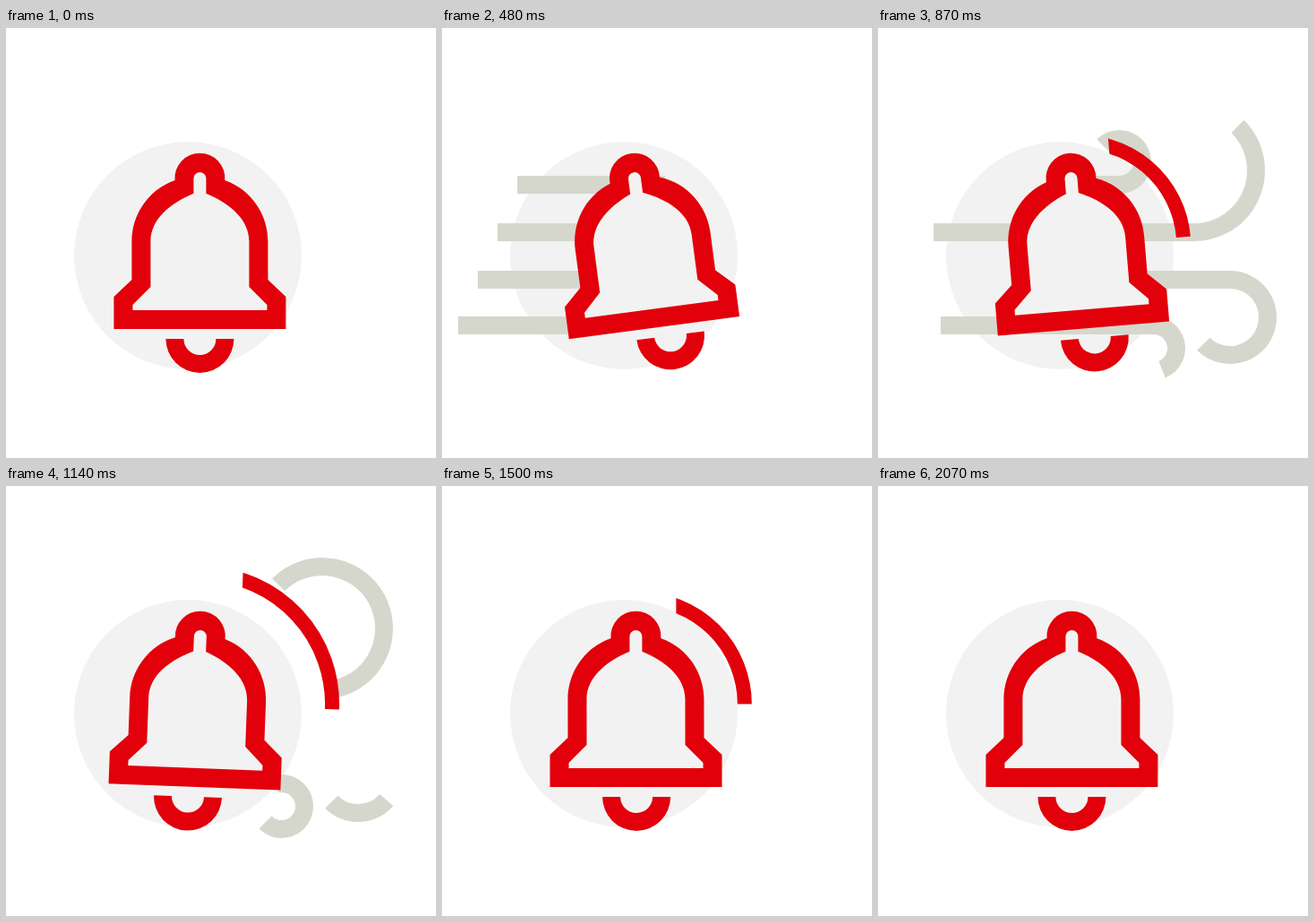
Recreate the animation shown at these times as an HTML page. Size 480 by 480 pixels, loop 2.1 s.

```html
<!DOCTYPE html>
<html lang="en">
<head>
<meta charset="utf-8">
<title>Bell in the wind</title>
<style>
  html, body { margin: 0; width: 100%; height: 100%; overflow: hidden; background: #fff; }
  svg { display: block; width: 100vw; height: 100vh; }
</style>
</head>
<body>
<svg viewBox="0 0 480 480">
  <clipPath id="sector"><rect x="261" y="0" width="260" height="243.5"/></clipPath>
  <circle cx="203" cy="254" r="127" fill="#f2f2f2"/>
  <g id="wind" fill="none" stroke="#d6d7cc" stroke-width="20"></g>
  <g id="bell" fill="#e2000a">
    <path d="M188.1 170A28 28 0 1 1 243.9 170C275 181 292 210 292 238V281L312 300V336H120V300L140 281V238C140 210 157 181 188.1 170Z"/>
    <path fill="#f2f2f2" d="M209 184.7V168a7 7 0 0 1 14 0V184.7C250 196 271 214 271 238V289L291 309V315H141V309L161 289V238C161 214 182 196 209 184.7Z"/>
    <path id="clapper" d="M178 347A38 38 0 0 0 254 347H234A18 18 0 0 1 198 347Z"/>
    <g clip-path="url(#sector)">
      <circle id="wave" cx="220" cy="243.5" fill="none" stroke="#e2000a" stroke-width="16"/>
    </g>
  </g>
</svg>
<script>
const LOOP = 2100, STEP = 30;
const RISE = 220, RELEASE = 406, HALF_SWING = 245;
const WAVE_START = 825, WAVE_PERIOD = 615, WAVE_END = 1820;

const $ = id => document.getElementById(id);
const bell = $('bell'), clapper = $('clapper'), wave = $('wave');
const clamp = v => Math.max(0, Math.min(1, v));

// Blown aside, held by the wind, then released into a fading swing.
function ring(t, size, fade) {
  if (t < RELEASE) return size * (1 - Math.cos(Math.PI * clamp(t / RISE))) / 2;
  const left = (LOOP - t) / (LOOP - RELEASE);
  return size * left ** fade * Math.cos(Math.PI * (t - RELEASE) / HALF_SWING);
}

// A gust is a straight run to turn, then a 225 degree curl (dir -1 up, 1 down).
function gust([y, turn, r, dir, start], i) {
  const x = 84 - 22 * i, k = r * Math.SQRT1_2;
  const path = document.createElementNS('http://www.w3.org/2000/svg', 'path');
  path.setAttribute('d', `M${x} ${y}H${turn}a${r} ${r} 0 1 ${dir > 0 ? 1 : 0} ${-k} ${dir * (r + k)}`);
  $('wind').append(path);
  return { path, start, length: turn - x + r * Math.PI * 1.25 };
}
const gusts = [
  [175, 269.5, 25.5, -1, 30],
  [228, 353, 69, -1, 240],
  [281, 393, 42, 1, 90],
  [332, 307.5, 25.5, 1, 150]
].map(gust);

function drawGust({ path, start, length }, t) {
  const head = length * clamp((t - start) / 780);
  const tail = length * clamp((t - start - 660) / 450);
  path.style.display = head > tail ? '' : 'none';
  path.setAttribute('stroke-dasharray', `0 ${tail} ${head - tail} 2000`);
}

function drawWave(t) {
  const visible = t >= WAVE_START && t < WAVE_END;
  wave.style.display = visible ? '' : 'none';
  if (!visible) return;
  const p = (t - WAVE_START) % WAVE_PERIOD / WAVE_PERIOD;
  wave.setAttribute('r', 110 + 61 * (1 - (1 - p) ** 1.25));
}

function draw(t) {
  bell.setAttribute('transform', `translate(0.4 0) rotate(${-ring(t, 15, 3.4)} 216 179)`);
  clapper.setAttribute('transform', `translate(${ring(t - 10, 27, 2.4)} 0)`);
  drawWave(t);
  gusts.forEach(g => drawGust(g, t));
}

const origin = performance.now();
function frame() {
  const t = (performance.now() - origin) % LOOP;
  draw(Math.floor(t / STEP) * STEP);
  requestAnimationFrame(frame);
}
frame();
</script>
</body>
</html>
```
